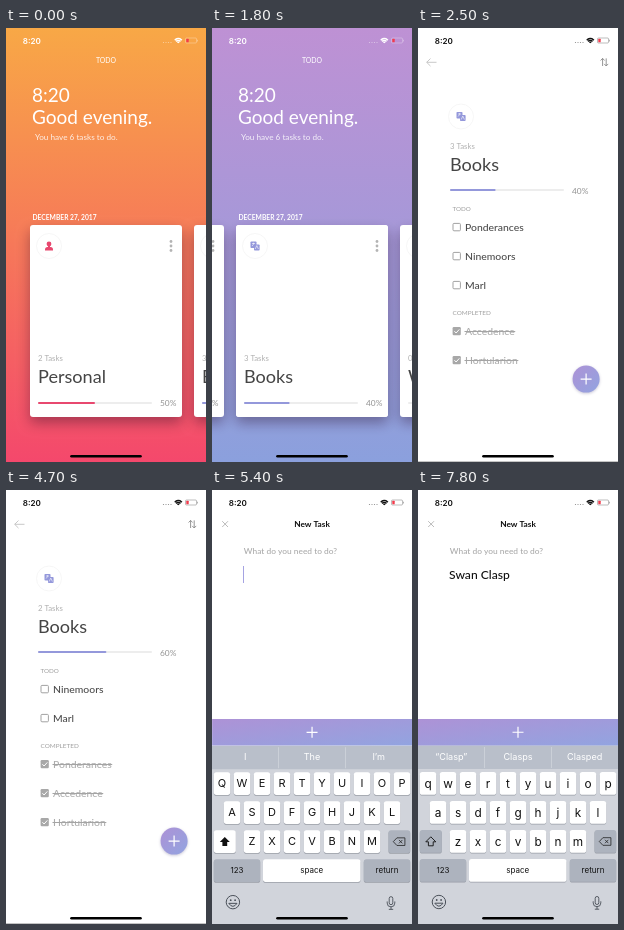
These frames come from a looping animation (200x434 px, 8000 ms). An HTML page with a canvas:

```html
<!DOCTYPE html>
<html lang="en">
<head>
<meta charset="utf-8">
<style>
html, body { margin: 0; height: 100%; overflow: hidden; background: #fff; }
canvas { display: block; width: 200px; height: 434px; }
</style>
</head>
<body>
<canvas id="stage"></canvas>
<script>
const W = 200, H = 434, LOOP = 8000, STEP = 100;
const canvas = document.getElementById('stage');
const ctx = canvas.getContext('2d');
const dpr = window.devicePixelRatio || 1;
canvas.width = W * dpr;
canvas.height = H * dpr;
ctx.scale(dpr, dpr);

const LATO = 'Lato, sans-serif', INTER = 'Inter, sans-serif';
const PURPLE = '#ad92d6', BLUE = '#92a4e0';
const ORANGE_SKY = [[248, 168, 70], [244, 72, 108]];
const PURPLE_SKY = [[190, 145, 212], [139, 160, 221]];
const CARDS = [
  { title: 'Personal', tasks: 2, percent: 50, color: '#e8486f', icon: personIcon },
  { title: 'Books', tasks: 3, percent: 40, color: '#9498db', icon: booksIcon },
  { title: 'Work', tasks: 0, percent: 0, color: '#5fb7a5', icon: () => {} }
];

// Each entry: time, typed text, suggestions, capitals on the keys
const START = ['I', 'The', 'I’m'], S = ['“S”', 'So', 'She'];
const SWAN = ['“Swan”', 'Swans', 'Swan’s'], NEXT = ['is', 'and', 'in'];
const C = ['“C”', 'Can', 'Come'], CLASP = ['“Clasp”', 'Clasps', 'Clasped'];
const TYPING = [
  [0, '', START, true], [5600, 'S', START, true], [5700, 'S', START, false], [5800, 'S', S, false],
  [6100, 'Sw', S, false], [6200, 'Swa', S, false], [6300, 'Swan', S, false],
  [6500, 'Swan', SWAN, false], [6600, 'Swan ', NEXT, false], [6700, 'Swan ', NEXT, true],
  [6800, 'Swan C', C, true], [6900, 'Swan C', C, false], [7100, 'Swan Cl', C, false],
  [7300, 'Swan Cla', C, false], [7400, 'Swan Clas', C, false],
  [7600, 'Swan Clasp', C, false], [7700, 'Swan Clasp', CLASP, false]
];

const lerp = (a, b, k) => a + (b - a) * k;
const ramp = (t, a, b) => Math.min(1, Math.max(0, (t - a) / (b - a)));
const smooth = u => u * u * (3 - 2 * u);

function text(s, x, cy, size, color, { font = LATO, weight = 400, align = 'left' } = {}) {
  ctx.font = `${weight} ${size}px ${font}`;
  ctx.textAlign = align;
  ctx.fillStyle = color;
  ctx.fillText(s, x, cy + size * 0.36);
}

function box(x, y, w, h, r, fill) {
  ctx.beginPath();
  ctx.roundRect(x, y, w, h, r);
  ctx.fillStyle = fill;
  ctx.fill();
}

function dot(x, y, r, fill) {
  ctx.beginPath();
  ctx.arc(x, y, r, 0, 7);
  ctx.fillStyle = fill;
  ctx.fill();
}

function stroke(path, color, width = 1) {
  ctx.strokeStyle = color;
  ctx.lineWidth = width;
  ctx.stroke(new Path2D(path));
}

function faded(alpha, draw) {
  if (alpha <= 0) return;
  ctx.save();
  ctx.globalAlpha *= alpha;
  draw();
  ctx.restore();
}

function shadowed(color, blur, dy, draw) {
  ctx.save();
  ctx.shadowColor = color;
  ctx.shadowBlur = blur * dpr;
  ctx.shadowOffsetY = dy * dpr;
  draw();
  ctx.restore();
}

function personIcon(x, y, color) {
  dot(x, y - 2, 2.4, color);
  box(x - 4, y + 1, 8, 3.4, [2.5, 2.5, 0, 0], color);
  box(x - 1, y - 1, 2, 3, 0, color);
}

function booksIcon(x, y, color) {
  box(x - 4.5, y - 4.5, 6, 6.5, 0.8, color);
  stroke(`M${x - 3} ${y - 2.5}h3M${x - 1.5} ${y - 3.3}v1.5l-1.4 1.8`, '#fff', 0.6);
  box(x - 1, y - 1.5, 5.6, 6, 0.8, color);
  stroke(`M${x + 0.2} ${y + 3}l1.6 -3.4l1.6 3.4`, '#fff', 0.6);
}

function statusBar(color) {
  text('8:20', 16.8, 12.7, 8.1, color, { font: INTER, weight: 600 });
  faded(0.5, () => [157.5, 160, 162.5, 165].forEach(x => dot(x, 14.5, 0.6, color)));
  for (const r of [1, 2.9, 4.7]) {
    ctx.beginPath();
    ctx.arc(172.3, 15.3, r, -Math.PI * 0.77, -Math.PI * 0.23);
    ctx.strokeStyle = color;
    ctx.lineWidth = 1.5;
    ctx.stroke();
  }
  faded(0.4, () => {
    stroke('M180.5 10h9q1 0 1 1v3q0 1 -1 1h-9q-1 0 -1 -1v-3q0 -1 1 -1z', color, 0.7);
    box(191.2, 11.6, 0.8, 2, 0.4, color);
  });
  box(180.3, 10.8, 2.4, 3.5, 0.5, '#f23b4c');
}

function cardContent(card, x, k, tasks = card.tasks, percent = card.percent) {
  const rise = -212 * k, barY = 374 - 213 * k, iconY = lerp(218, 88.5, k);
  ctx.beginPath();
  ctx.arc(x + 19, iconY, 12.5, 0, 7);
  ctx.strokeStyle = '#f4f4f4';
  ctx.lineWidth = 0.8;
  ctx.stroke();
  card.icon(x + 19, iconY, card.color);
  faded(1 - k * 2, () => [213.5, 218, 222.5].forEach(y => dot(x + 141, y - 130 * k, 1.4, '#b4b4b4')));
  text(`${tasks} Tasks`, x + 8, 330.3 + rise, 7.8, '#b0b0b0');
  text(card.title, x + 8, 348.6 + rise, 18.1, '#454545');
  box(x + 8, barY, 114, 2, 1, '#ededed');
  box(x + 8, barY, 1.14 * percent, 2, 1, card.color);
  text(`${Math.round(percent)}%`, x + 130, 374.7 + rise, 8.4, '#929292');
}

function home(t) {
  const tint = smooth(ramp(t, 700, 1200));
  const sky = ctx.createLinearGradient(0, 0, 0, H);
  ORANGE_SKY.forEach((c, i) =>
    sky.addColorStop(i, `rgb(${c.map((v, j) => Math.round(lerp(v, PURPLE_SKY[i][j], tint)))})`));
  box(0, 0, W, H, 0, sky);
  text('TODO', 100, 32.5, 6.9, '#fff', { align: 'center' });
  text('8:20', 26, 67, 19, '#fff');
  text('Good evening.', 26, 89.5, 19, '#fff');
  text('You have 6 tasks to do.', 29, 109.5, 8.2, 'rgba(255,255,255,.85)');
  text('DECEMBER 27, 2017', 26.5, 189.5, 6.7, '#fff', { weight: 700 });

  const scroll = 164 * smooth(ramp(t, 0, 600));
  CARDS.forEach((card, i) => {
    const x = 24 + i * 164 - scroll;
    shadowed('rgba(40,10,40,.38)', 13, 6, () => box(x, 197, 152, 192, 3, '#fff'));
    cardContent(card, x, 0);
  });
}

function task(name, y, done) {
  if (done) {
    box(34.6, y - 4, 8.2, 8.2, 1.2, '#a8a8a8');
    stroke(`M36.4 ${y + 0.2}l1.7 1.8l3.2 -3.6`, '#fff', 1);
  } else {
    stroke(`M36 ${y - 3.6}h5.4q1 0 1 1v5.4q0 1 -1 1h-5.4q-1 0 -1 -1v-5.4q0 -1 1 -1z`, '#a2a2a2', 1);
  }
  text(name, 47, y - 0.2, 10.4, done ? '#acacac' : '#4c4c4c', { weight: 500 });
  if (done) box(46.5, y, ctx.measureText(name).width + 1, 0.9, 0, '#a4a4a4');
}

function taskList(t) {
  const k = smooth(ramp(t, 3700, 4100)), up = 29 * k;
  text('TODO', 34.5, 181, 6.3, '#a0a0a0');
  faded(1 - k, () => task('Ponderances', 199, t >= 3800));
  task('Ninemoors', 228 - up, false);
  task('Marl', 257 - up, false);
  text('COMPLETED', 34.5, 285 - up, 6.4, '#a0a0a0');
  faded(k, () => task('Ponderances', 274, true));
  task('Accedence', 303, true);
  task('Hortularion', 332, true);
}

function detail(t) {
  const k = smooth(ramp(t, 1800, 2500));
  box(lerp(24, 0, k), lerp(197, 0, k), lerp(152, W, k), lerp(192, H, k), 3 * (1 - k), '#fff');
  const percent = lerp(40, 60, smooth(ramp(t, 3700, 4100)));
  cardContent(CARDS[1], 24, k, t >= 3800 ? 2 : 3, percent);
  faded(ramp(k, 0.5, 1), () => {
    stroke('M18.5 34.3h-9.8M12.5 30.5l-3.8 3.8l3.8 3.8', '#c2c2c2', 0.9);
    stroke('M184.6 38v-7.6M182.6 32.5l2 -2.1l2 2.1M188.2 30.4v7.6M186.2 35.9l2 2.1l2 -2.1', '#8a8a8a', 0.9);
    taskList(t);
    box(0, 433, W, 1, 0, '#c4c4c4');
  });
}

function newTask(t, typed) {
  box(0, 0, W, H, 0, '#fff');
  stroke('M10.2 31.2l5.8 5.8M16 31.2l-5.8 5.8', '#aaa', 0.8);
  text('New Task', 100, 34, 8.3, '#111', { weight: 700, align: 'center' });
  text('What do you need to do?', 31.8, 60.8, 8.4, '#aaa', { weight: 500 });
  text(typed, 31, 84.2, 12.1, '#111', { weight: 500 });
  if (t < 7800) box(31 + ctx.measureText(typed).width, 76, 1, 17, 0, '#a5a3e2');
}

// Circle at the lower right grows into the full-width bar above the keyboard
function addButton(k) {
  const x = lerp(154.6, 0, k), y = lerp(337.6, 229, k);
  const w = lerp(27, W, k), h = lerp(27, 26.5, k);
  const cx = x + w / 2, cy = y + h / 2, d2 = w * w + h * h;
  const dx = w * h * h / d2, dy = w * w * h / d2;
  const fill = ctx.createLinearGradient(cx - dx, cy - dy, cx + dx, cy + dy);
  fill.addColorStop(0, PURPLE);
  fill.addColorStop(1, BLUE);
  shadowed(`rgba(60,50,110,${0.28 * (1 - k)})`, 3, 1, () => box(x, y, w, h, 13.5 * (1 - k), fill));
  stroke(`M${cx - 5.5} ${cy}h11M${cx} ${cy - 5.5}v11`, '#fff', 1.2);
}

function key(x, cy, w, label, size = 8, fill = '#fff') {
  box(x, cy - 10.7, w, 22.8, 2.6, '#9a9ea7');
  box(x, cy - 11.5, w, 22.8, 2.6, fill);
  text(label, x + w / 2, cy - 0.2, size, '#111', { font: INTER, align: 'center' });
}

function keyboard(offset, suggestions, caps) {
  const GREY = '#adb3be', INK = '#4a5059';
  ctx.save();
  ctx.translate(0, offset);
  box(0, 255.5, W, 179, 0, '#d1d4db');
  box(0, 255.5, W, 23.5, 0, '#b9bfca');
  box(66.3, 257, 0.7, 21, 0, '#d3d7de');
  box(133, 257, 0.7, 21, 0, '#d3d7de');
  suggestions.forEach((s, i) => text(s, 33.3 + i * 66.7, 266.6, 9.1, '#fff', { font: INTER, align: 'center' }));

  ['qwertyuiop', 'asdfghjkl', 'zxcvbnm'].forEach((row, r) =>
    [...row].forEach((c, i) =>
      key([10, 20, 40][r] + i * 20 - 8.2, 293.5 + r * 29, 16.4, caps ? c.toUpperCase() : c, caps ? 11 : 11.8)));

  key(1.8, 351.5, 22, '', 8, caps ? '#fff' : GREY);
  const arrow = new Path2D('M12.8 346.8l5 5h-2.6v4h-4.8v-4h-2.6z');
  ctx.fillStyle = ctx.strokeStyle = '#111';
  ctx.lineWidth = 0.9;
  caps ? ctx.fill(arrow) : ctx.stroke(arrow);
  key(176.5, 351.5, 21.7, '', 8, GREY);
  stroke('M181.3 351.5l3.6 -3.8h8v7.6h-8zM187 349.8l3.4 3.4M190.4 349.8l-3.4 3.4', '#222', 0.8);

  key(1.8, 380.5, 46.4, '123', 8, GREY);
  key(51, 380.5, 97.5, 'space');
  key(151.8, 380.5, 46.4, 'return', 8, GREY);

  stroke('M14.2 412a6.7 6.7 0 1 0 13.4 0a6.7 6.7 0 1 0 -13.4 0M16.8 413.2q4.1 6 8.2 0z', INK, 1);
  dot(18.7, 410, 0.9, INK);
  dot(23.1, 410, 0.9, INK);
  stroke('M177.2 408.3a1.8 1.8 0 0 1 3.6 0v4.4a1.8 1.8 0 0 1 -3.6 0zM175.2 411.3v1.6a3.8 3.8 0 0 0 7.6 0v-1.6M179 416.8v2.4M176.8 419.2h4.4', INK, 0.9);
  ctx.restore();
}

function draw() {
  const t = Math.floor(performance.now() % LOOP / STEP) * STEP;
  const compose = 1 - (1 - ramp(t, 4700, 5500)) ** 3.4;
  const [, typed, suggestions, caps] = TYPING.findLast(entry => entry[0] <= t);

  if (t < 2500) home(t);
  if (t >= 1800) detail(t);
  faded(ramp(t, 4700, 5000), () => newTask(t, typed));
  if (compose > 0) keyboard((1 - compose) * 184, suggestions, caps);
  faded(ramp(t, 2200, 2500), () => addButton(compose));
  statusBar(t < 2200 ? '#fff' : '#111');
  box(64.2, 427, 71.6, 2.6, 1.3, '#000');
  requestAnimationFrame(draw);
}
draw();
</script>
</body>
</html>
```
